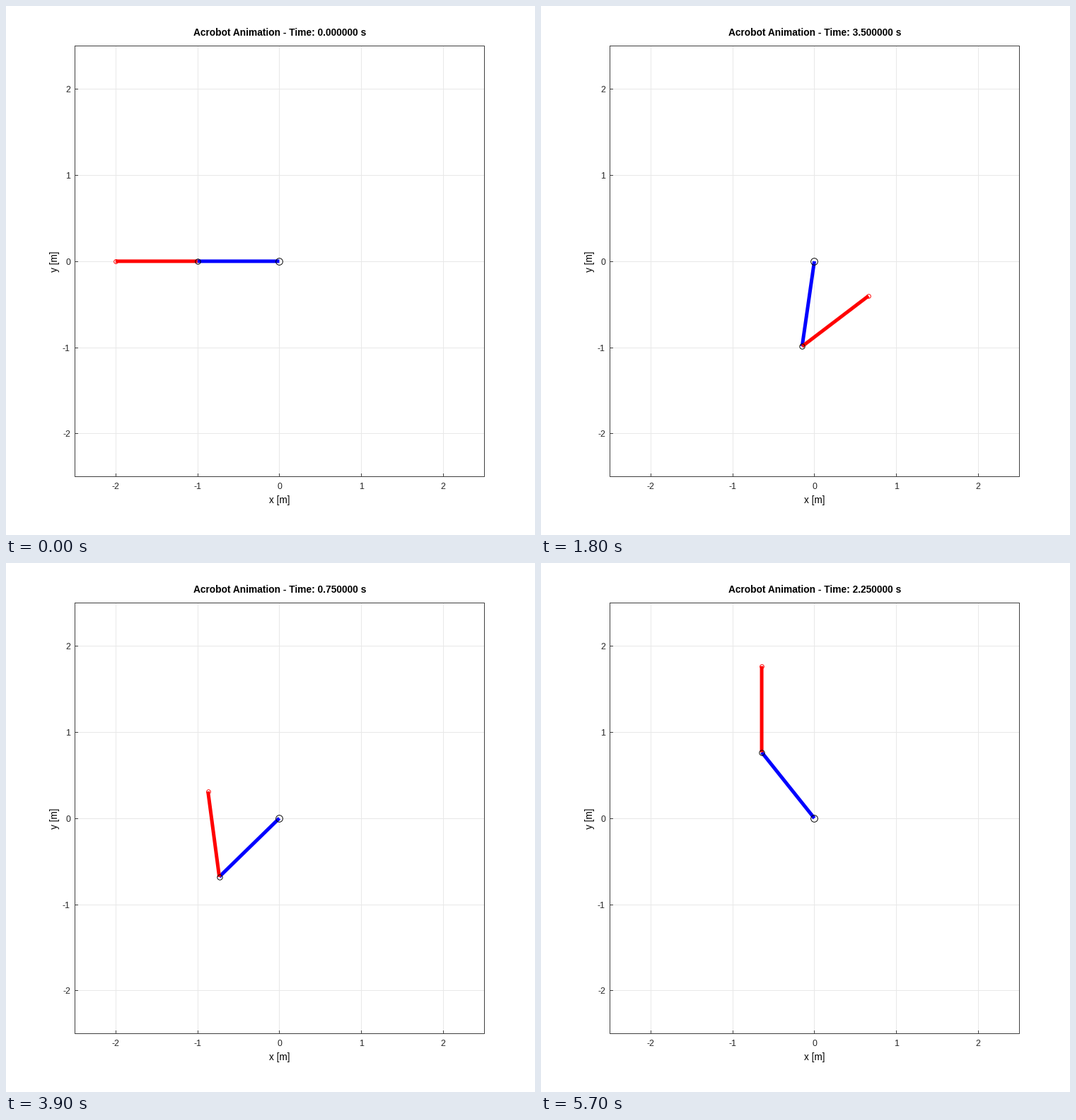
These frames come from a looping animation (748x748 px, 6 s). A matplotlib script:

```python
import math

import matplotlib.pyplot as plt
from matplotlib.animation import FuncAnimation

SIZE, DPI = 748, 64
PX = 72 / DPI                      # points per pixel
LEFT, RIGHT, TOP, BOTTOM = 97, 676, 56.4, 665.4
LINE, DARK, GRID = "#404040", "#262626", "#e8e8e8"
POSES, STEP = 20, 0.25             # simulated poses and seconds between them

# Swing of each link as turning points: (pose, angle in degrees, speed)
UPPER = [(0, 180, 11), (4, 225, -5), (9, 130, 5),
         (12, 174, 43), (15, 293.5, 24), (19, 351, 5)]
LOWER = [(0, 180, -14), (7, 25, 10), (9, 90, 45),
         (12, 281.5, 83), (15, 411, 0), (19, 368, -14)]

# Poses play in alphabetical order of their index: 0, 1, 10, 11, ... 2, 3, ...
ORDER = sorted(range(POSES), key=str)

plt.rcParams["font.family"] = "Liberation Sans"
fig = plt.figure(figsize=(SIZE / DPI, SIZE / DPI), dpi=DPI, facecolor="white")
ax = fig.add_axes([0, 0, 1, 1])
ax.set_xlim(0, SIZE)
ax.set_ylim(SIZE, 0)
ax.axis("off")


def swing(keys, k):
    """Angle in radians at pose k, by cubic easing between turning points."""
    for (k0, a0, v0), (k1, a1, v1) in zip(keys, keys[1:]):
        if k <= k1:
            break
    h = k1 - k0
    u = (k - k0) / h
    ease = u * u * (3 - 2 * u)
    bend = h * u * (1 - u) * (v0 * (1 - u) - v1 * u)
    return math.radians(a0 + (a1 - a0) * ease + bend)


def to_px(x, y):
    return (LEFT + (x + 2.5) / 5 * (RIGHT - LEFT),
            BOTTOM - (y + 2.5) / 5 * (BOTTOM - TOP))


def crisp(v):
    return round(v) + 0.5


def thin(xs, ys, color, z):
    ax.plot(xs, ys, color=color, lw=PX, zorder=z, snap=False,
            solid_capstyle="projecting")


def label(x, y, s, size, ha="center", **kw):
    return ax.text(x, y, s, fontsize=size * PX, ha=ha, va="baseline", **kw)


def link(color):
    return ax.plot([], [], color=color, lw=5 * PX, zorder=3, snap=False,
                   solid_capstyle="butt")[0]


def ring(color, size):
    return ax.plot([], [], "o", ms=size * PX, mfc="none", mec=color,
                   mew=0.95 * PX, zorder=4, snap=False)[0]


x0, x1, y0, y1 = map(crisp, (LEFT, RIGHT, TOP, BOTTOM))
for v in range(-2, 3):
    px, py = to_px(v, v)
    gx, gy = crisp(px), crisp(py)
    thin([gx, gx], [y0, y1], GRID, 1)
    thin([x0, x1], [gy, gy], GRID, 1)
    thin([gx, gx], [y1 - 4, y1], LINE, 2)
    thin([x0, x0 + 4], [gy, gy], LINE, 2)
    label(px, 683, str(v), 12.4, color=DARK)
    label(91, py + 4.8, str(v), 12.4, ha="right", color=DARK)
thin([x0, x1, x1, x0, x0], [y0, y0, y1, y1, y0], LINE, 2)

mid_x, mid_y = to_px(0, 0)
label(mid_x, 702.5, "x [m]", 13.6, color="black")
label(73, mid_y, "y [m]", 13.6, color="black", rotation=90,
      rotation_mode="anchor")
title = label(mid_x + 0.5, 42, "", 13.72, color="black", weight="bold")

blue, red = link("#0000ff"), link("#ff0000")
base, elbow, tip = ring("black", 9.7), ring("black", 7.4), ring("#ff0000", 5.7)
base.set_data([mid_x], [mid_y])


def draw(i):
    k = ORDER[i]
    a, b = swing(UPPER, k), swing(LOWER, k)
    ex, ey = math.cos(a), math.sin(a)
    e = to_px(ex, ey)
    t = to_px(ex + math.cos(b), ey + math.sin(b))
    blue.set_data([mid_x, e[0]], [mid_y, e[1]])
    red.set_data([e[0], t[0]], [e[1], t[1]])
    elbow.set_data([e[0]], [e[1]])
    tip.set_data([t[0]], [t[1]])
    title.set_text(f"Acrobot Animation - Time: {k * STEP:.6f} s")
    return blue, red, elbow, tip, title


anim = FuncAnimation(fig, draw, frames=POSES, interval=300, repeat=True,
                     repeat_delay=0, blit=False)
plt.show()
```
